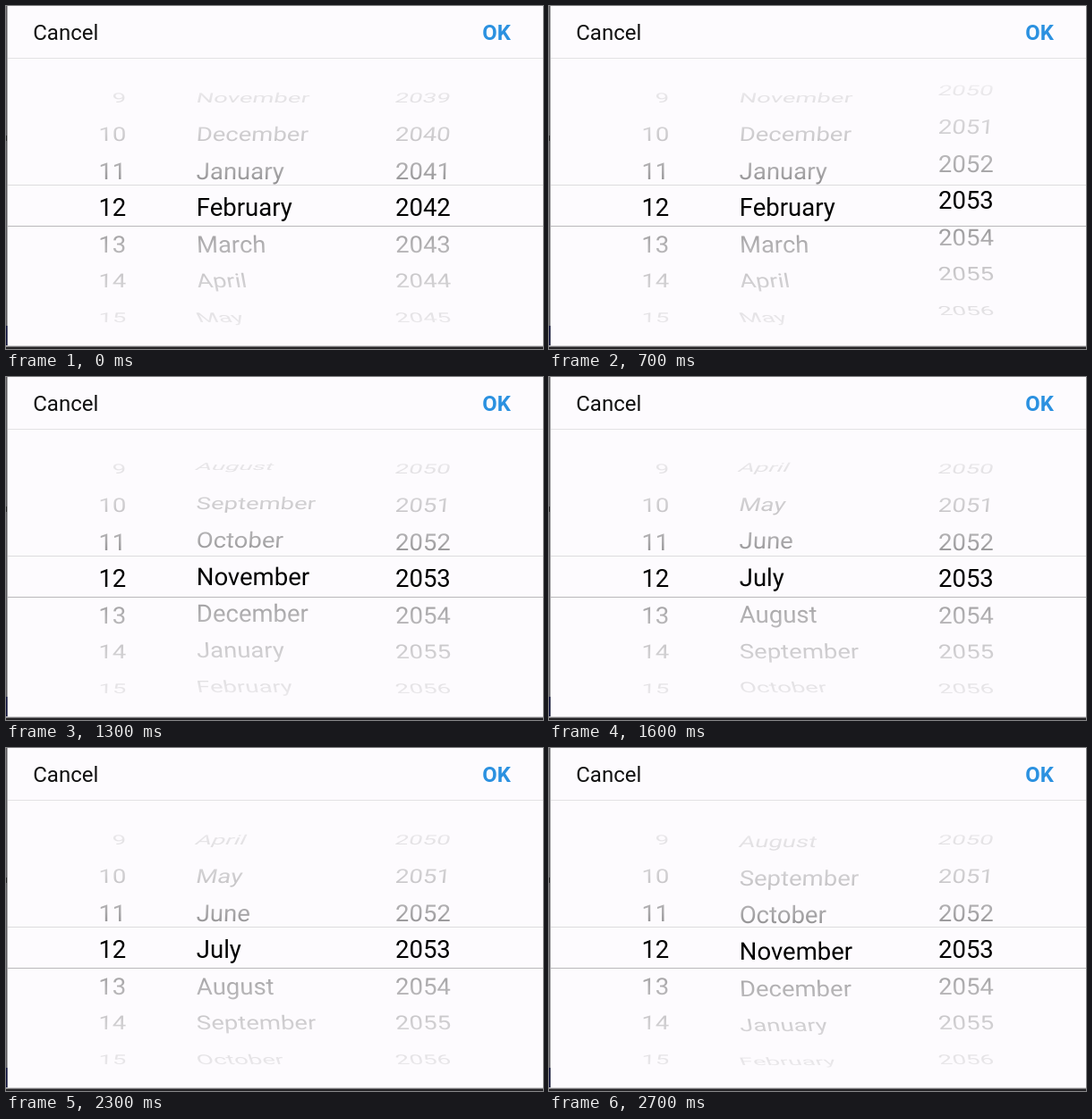
These frames come from a looping animation (600 by 384 pixels, 2800 ms). An HTML page with a canvas:

```html
<!DOCTYPE html>
<html lang="en">
<head>
<meta charset="utf-8">
<title>Date picker</title>
<style>
  html, body { margin: 0; width: 100%; height: 100%; overflow: hidden; background: #fdfbfe; }
  canvas { display: block; }
</style>
</head>
<body>
<canvas width="600" height="384"></canvas>
<script>
const ctx = document.querySelector('canvas').getContext('2d');
const LOOP = 2800, STEP = 100;
const MIDDLE = 225.4, ROW = 41.1, ROW_ANGLE = 19 * Math.PI / 180;
const TOP = 59, BAND_TOP = 200, BAND_BOTTOM = 246, BOTTOM = 381;
const BACKGROUND = '#fdfbfe';
const MONTHS = ['January', 'February', 'March', 'April', 'May', 'June', 'July',
  'August', 'September', 'October', 'November', 'December'];

const smooth = u => u * u * (3 - 2 * u);
const linear = u => u;
const easeIn = u => u ** 1.3;
const easeOut = u => 1 - (1 - u) ** 2;

// Each move is [start, end, target, easing].
function follow(start, moves) {
  return time => {
    let value = start;
    for (const [from, to, target, ease] of moves) {
      const u = Math.min(1, Math.max(0, (time - from) / (to - from)));
      value += (target - value) * ease(u);
    }
    return value;
  };
}

const wheels = [
  { x: 134.3, align: 'right', centre: 115, label: i => String(i), position: () => 12 },
  { x: 212.8, align: 'left', centre: 303, label: i => MONTHS[(i + 12) % 12],
    position: follow(13, [
      [1100, 1300, 10.05, linear],
      [1300, 1600, 6.03, easeOut],
      [1600, 1700, 6, smooth],
      [2300, 2700, 9.95, easeIn]
    ]) },
  { x: 435, align: 'left', centre: 500, label: i => String(i),
    position: follow(2042, [
      [200, 700, 2053.2, smooth],
      [700, 800, 2053, smooth]
    ]) }
];

function drawWheel(wheel, time) {
  const position = wheel.position(time);
  const speed = position - wheel.position(Math.max(0, time - STEP));
  const tilt = Math.max(-0.6, Math.min(0.6, speed * 0.28));
  ctx.font = '27.5px Roboto, sans-serif';
  ctx.textAlign = wheel.align;
  const first = Math.round(position) - 4;
  for (let i = first; i <= first + 8; i++) {
    const distance = i - position;
    if (Math.abs(distance) > 3.55) continue;
    const angle = (distance + tilt) * ROW_ANGLE;
    const text = wheel.label(i);
    const half = ctx.measureText(text).width / 2;
    const textCentre = wheel.x + (wheel.align === 'right' ? -half : half);
    const skew = Math.sin(angle) * Math.abs(Math.sin(angle)) * (wheel.centre - textCentre) * 0.006;
    ctx.save();
    ctx.translate(wheel.x, MIDDLE + distance * ROW);
    ctx.transform(1, 0, skew, Math.max(0.05, Math.cos(angle)), 0, 0);
    ctx.fillText(text, 0, 10);
    ctx.restore();
  }
}

function fade(top, bottom, stops) {
  const gradient = ctx.createLinearGradient(0, top, 0, bottom);
  for (const [y, alpha] of stops) {
    gradient.addColorStop((y - top) / (bottom - top), `rgba(253,251,254,${alpha})`);
  }
  rect(0, top, 600, bottom - top, gradient);
}

function rect(x, y, width, height, color) {
  ctx.fillStyle = color;
  ctx.fillRect(x, y, width, height);
}

function label(text, x, y, font, color) {
  ctx.font = font;
  ctx.textAlign = 'left';
  ctx.fillStyle = color;
  ctx.fillText(text, x, y);
}

function draw(time) {
  rect(0, 0, 600, 384, BACKGROUND);
  ctx.save();
  ctx.beginPath();
  ctx.rect(0, TOP, 600, BOTTOM - TOP);
  ctx.clip();
  ctx.fillStyle = '#000';
  for (const wheel of wheels) drawWheel(wheel, time);
  ctx.restore();

  fade(TOP, BAND_TOP, [[59, 1], [80, 0.97], [102, 0.91], [143, 0.82], [184, 0.67], [200, 0.56]]);
  fade(BAND_BOTTOM, BOTTOM, [[246, 0.6], [267, 0.7], [308, 0.82], [348, 0.91], [381, 0.98]]);

  rect(0, 58, 600, 1, '#e3e2e4');
  rect(0, BAND_TOP, 600, 1, '#dddcde');
  rect(0, BAND_BOTTOM, 600, 1, '#b9b8ba');
  label('Cancel', 30.2, 37.5, '24px Roboto, sans-serif', '#111');
  label('OK', 532.3, 37.5, 'bold 23.8px Roboto, sans-serif', '#2b91e0');

  rect(0, 0, 1, 384, '#5c5b5e');
  rect(1, 0, 1, 384, '#a9a8ab');
  rect(0, 145, 1, 6, '#222');
  rect(0, 358, 1.5, 26, '#10133f');
  rect(0, BOTTOM - 1, 600, 1, '#c9c8ca');
  rect(0, BOTTOM, 600, 1, '#6b6a6d');
  rect(0, BOTTOM + 1, 600, 2, '#252427');
}

function tick() {
  draw(Math.floor(performance.now() % LOOP / STEP) * STEP);
  requestAnimationFrame(tick);
}
tick();
</script>
</body>
</html>
```
